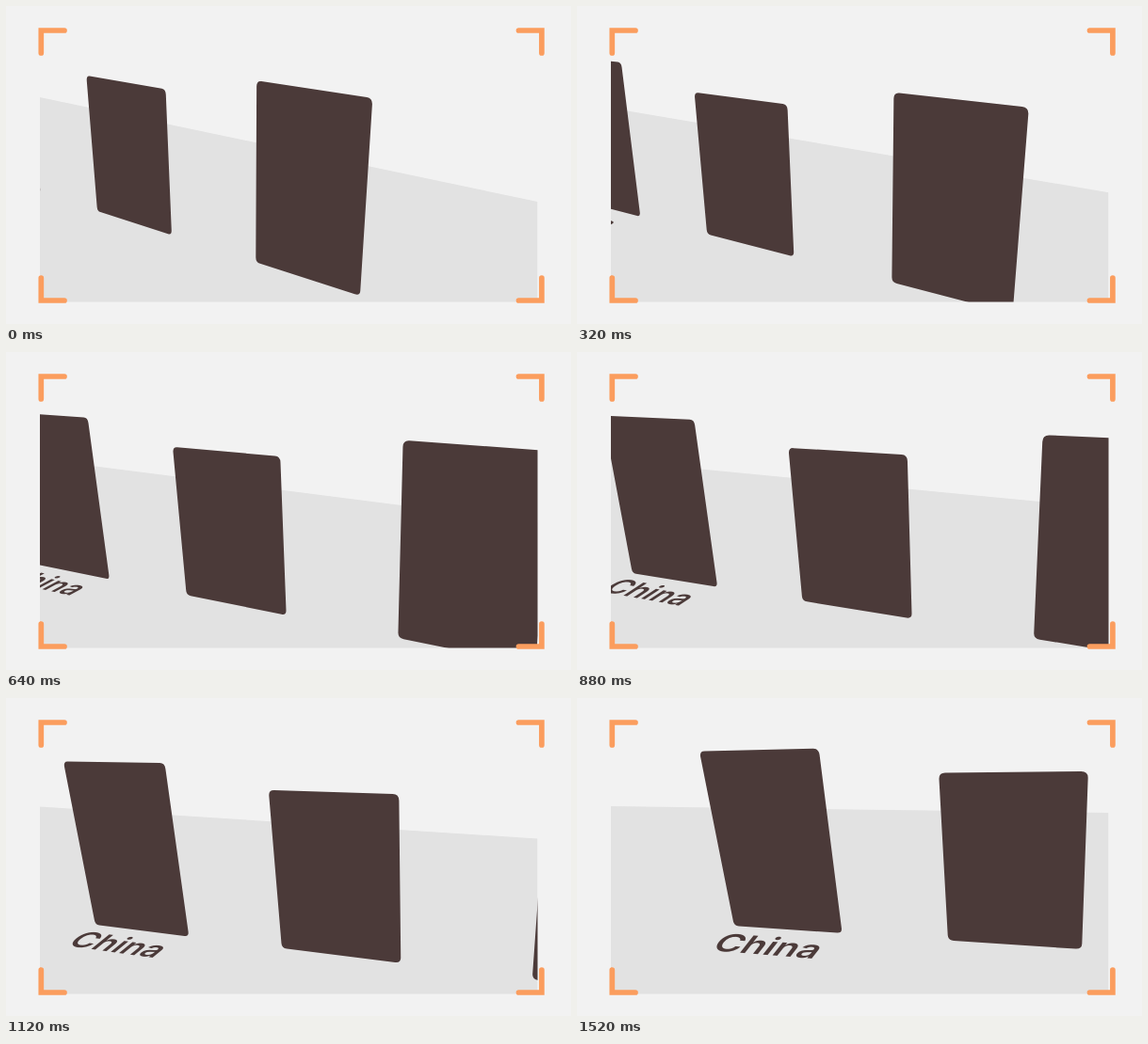
An HTML page that plays this animation: 600x338 px, repeating every 2000 ms.

```html
<!DOCTYPE html>
<html lang="en">
<head>
<meta charset="utf-8">
<title>Panels</title>
<style>
html, body { margin: 0; width: 100%; height: 100%; overflow: hidden; background: #f2f2f2; }
svg { display: block; width: 100vw; height: 100vh; }
text { font: 600 40px Inter, "Liberation Sans", sans-serif; text-anchor: middle; text-rendering: geometricPrecision; }
</style>
</head>
<body>
<svg viewBox="0 0 600 338">
  <defs><clipPath id="view"><rect x="36" y="24" width="528.5" height="290.5"/></clipPath></defs>
  <rect width="600" height="338" fill="#f2f2f2"/>
  <g clip-path="url(#view)" fill="#4b3a39">
    <path id="floor" fill="#e2e2e2"/>
    <path id="left"/>
    <path id="middle"/>
    <path id="right"/>
    <text id="label">China</text>
  </g>
  <path fill="none" stroke="#fb9d5e" stroke-width="5.7" stroke-linecap="round"
    d="M37.3 50V26H62M544.5 26H568.9V50M37.3 289V313H62M544.5 313H568.9V289"/>
</svg>
<script>
const LOOP = 2000, STEP = 40, MOVE = 1520;
const FOCAL = 700, CX = 300, CY = 169;
const el = id => document.getElementById(id);
const poly = (s, ...k) => k.reduceRight((sum, c) => sum * s + c, 0);

// Homogeneous screen vectors: base corner, one panel width along, one panel height up
function camera(s) {
  const along = [poly(s, 65.6, 45.3), poly(s, 7, -13), poly(s, -0.076, 0.005, 0.0128)];
  const up = [poly(s, -20, -24, -12.2), poly(s, -170.5, -44.5, 2.4), poly(s, -0.078, -0.01, -0.029)];
  const base = [poly(s, 97, 164, 153, -20), poly(s, 218, 136.5, -97), 1];
  return { base, along, up, back: depth(along, up) };
}

// Floor direction at right angles to the wall, as long as one panel width
function depth(along, up) {
  const ray = ([x, y, w]) => [(x - CX * w) / FOCAL, (y - CY * w) / FOCAL, w];
  const [a, b, c] = ray(along), [p, q, r] = ray(up);
  const n = [b * r - c * q, c * p - a * r, a * q - b * p];
  const k = Math.hypot(a, b, c) / Math.hypot(...n) * Math.sign(n[2]);
  const [x, y, w] = n.map(v => v * k);
  return [x * FOCAL + CX * w, y * FOCAL + CY * w, w];
}

function project(cam, u, v, z = 0) {
  const [x, y, w] = cam.base.map((p, i) => p + u * cam.along[i] + v * cam.up[i] + z * cam.back[i]);
  return [x / w, y / w];
}

// Standing rectangle with rounded corners, one unit wide
function panel(id, cam, u, height) {
  const at = (x, y) => project(cam, u + x, y).map(n => n.toFixed(2)).join(" ");
  const rx = 0.045, ry = 0.03, h = height;
  el(id).setAttribute("d",
    `M${at(0, ry)}L${at(0, h - ry)}Q${at(0, h)} ${at(rx, h)}` +
    `L${at(1 - rx, h)}Q${at(1, h)} ${at(1, h - ry)}` +
    `L${at(1, ry)}Q${at(1, 0)} ${at(1 - rx, 0)}` +
    `L${at(rx, 0)}Q${at(0, 0)} ${at(0, ry)}Z`);
}

// Text lying on the floor, sheared to the perspective at its middle
function lay(id, cam, u, z) {
  const size = 40, em = 0.325, tall = 0.364, e = 0.1;
  const [x, y] = project(cam, u, 0, z);
  const [ax, ay] = project(cam, u + e, 0, z);
  const [bx, by] = project(cam, u, 0, z + e);
  const m = em / e / size, n = -tall / e / size;
  el(id).setAttribute("transform",
    `matrix(${[(ax - x) * m, (ay - y) * m, (bx - x) * n, (by - y) * n, x, y].join(" ")})`);
}

function draw(s) {
  const cam = camera(s);
  const edgeL = poly(s, 97, 72, -91, 37), edgeR = poly(s, 208, -26, -108, 48);
  el("floor").setAttribute("d", `M36 ${edgeL}L564.5 ${edgeR}V315H36Z`);
  panel("left", cam, -1.883, 1);
  panel("middle", cam, 0, 0.875);
  panel("right", cam, 1.962, 1);
  lay("label", cam, -1.425, -0.41);
}

const start = performance.now();
function tick(now) {
  const t = Math.max(0, now - start) % LOOP;
  draw(Math.min(1, Math.floor(t / STEP) * STEP / MOVE));
  requestAnimationFrame(tick);
}
draw(0);
requestAnimationFrame(tick);
</script>
</body>
</html>
```
